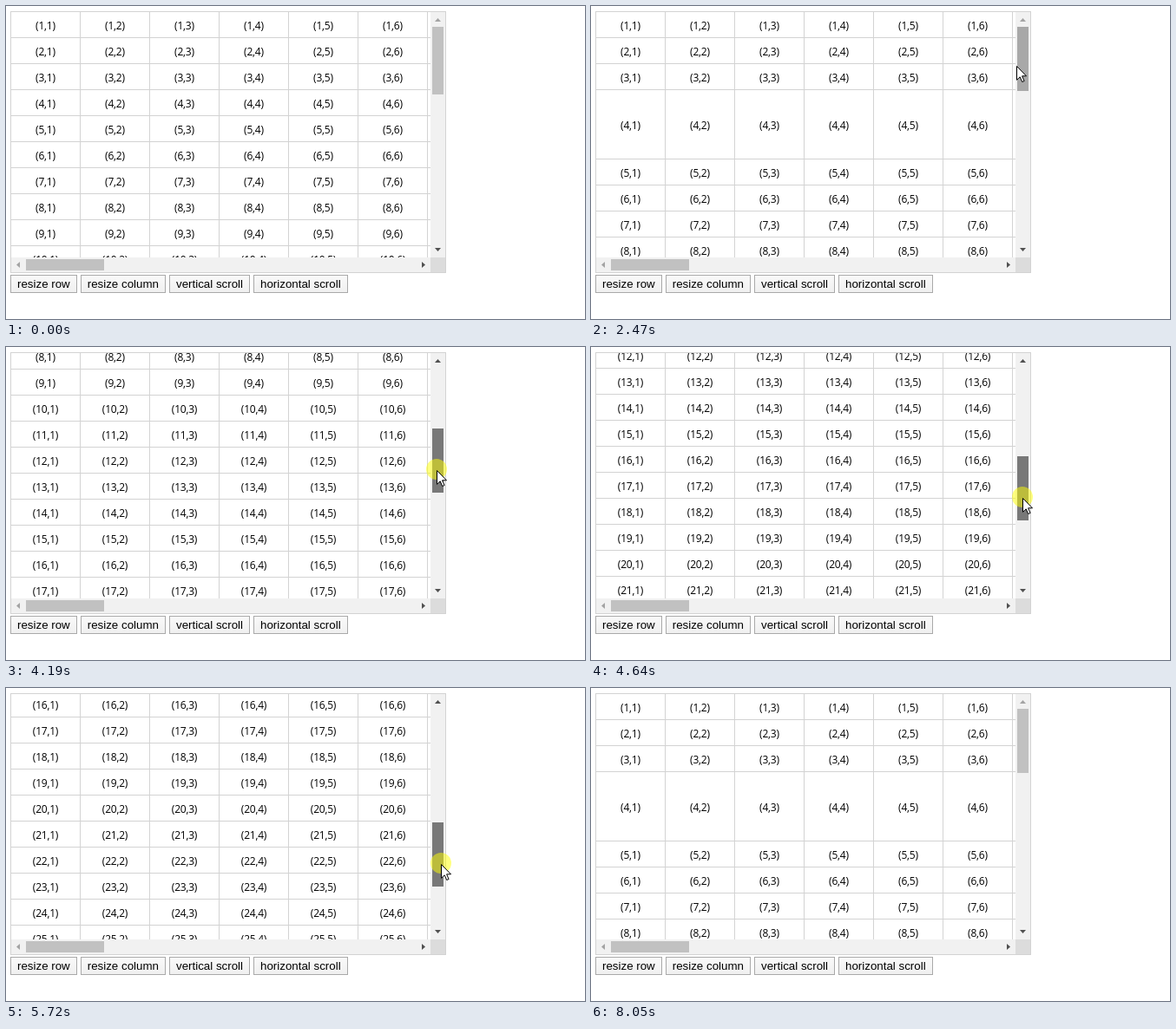
An HTML page for the animation above (8590 ms loop, 667 px wide and 361 px high).

```html
<!DOCTYPE html>
<html lang="en">
<head>
<meta charset="utf-8">
<title>Grid: resize and scroll</title>
<style>
  html, body { margin: 0; width: 100%; height: 100%; overflow: hidden; background: #fff; }
  body { position: relative; pointer-events: none; user-select: none; }
  body > * { position: absolute; box-sizing: border-box; }
  #frame { left: 5px; top: 6px; width: 502px; height: 302px; border: 1px solid #d3d3d3; }
  #view { left: 6px; top: 7px; width: 483px; height: 283px; overflow: hidden; }
  .row { display: flex; width: 560px; height: 30px; }
  .row span {
    box-sizing: border-box; width: 80px; padding-top: 2px;
    display: flex; align-items: center; justify-content: center;
    border: solid #d3d3d3; border-width: 0 1px 1px 0;
    font: 12px "Open Sans", "Noto Sans", sans-serif; letter-spacing: -.2px; color: #000;
  }
  .track { background: #f1f1f1; }
  .thumb { background: #c1c1c1; }
  #vtrack { left: 489px; top: 7px; width: 17px; height: 283px; }
  #htrack { left: 6px; top: 290px; width: 483px; height: 17px; }
  #corner { left: 489px; top: 290px; width: 17px; height: 17px; background: #dcdcdc; }
  #vthumb { left: 491px; width: 13px; }
  #hthumb { left: 23px; top: 292px; width: 90px; height: 13px; }
  #bar { left: 5px; top: 310px; display: flex; gap: 4px; }
  .btn {
    box-sizing: border-box; height: 21px; padding: 0 7px; white-space: nowrap;
    border: 1px solid #a9a9a9; background: linear-gradient(#f9f9f9, #f0f0f0);
    font: 13.333px/19px "Liberation Sans", Arial, sans-serif; color: #000;
  }
  .btn.hover { border-color: #7b7b7b; background: linear-gradient(#fcfcfc, #f4f4f4); }
  .btn.down { border-color: #707070; background: linear-gradient(#dedede, #e8e8e8); }
  svg { left: 0; top: 0; }
</style>
</head>
<body>
<div id="frame"></div>
<div id="view"><div id="rows"></div></div>
<div id="vtrack" class="track"></div>
<div id="htrack" class="track"></div>
<div id="corner"></div>
<div id="vthumb" class="thumb"></div>
<div id="hthumb" class="thumb"></div>
<div id="bar">
  <div class="btn">resize row</div>
  <div class="btn">resize column</div>
  <div class="btn">vertical scroll</div>
  <div class="btn">horizontal scroll</div>
</div>
<svg width="667" height="361">
  <path id="up" d="M494 18h7l-3.5 -4z"/>
  <path id="down" d="M494 279h7l-3.5 4z"/>
  <path fill="#a3a3a3" d="M16 295v7l-4 -3.5z"/>
  <path fill="#505050" d="M479 295v7l4 -3.5z"/>
  <g id="mouse">
    <circle id="halo" r="12" fill="#ff0" fill-opacity=".5"/>
    <path d="M.5 1.5V17.3L4.2 13.8 6.7 19.5 9.1 18.5 6.6 12.8H11.5Z" fill="#fff" stroke="#000"/>
  </g>
</svg>
<script>
const LOOP = 8590, DELAY = 230, STEP = 77.2;
const VIEW = 283, TRACK = 249, TRACK_TOP = 24, GRAB_Y = 71;

// moments, counted in steps
const CLICK = 14, RESIZE = 16, GRAB = 33, RELEASE = 87, LEAVE = 90, END = 101;

// where the pointer changes course: step, x, y
const path = [
  [0, 406, 278], [8, 130, 328], [11, 52, 316], [12, 51, 321], [17, 51, 321],
  [29, 490, 68], [32, 495, GRAB_Y], [34, 496, GRAB_Y],
  [44, 496, 104.63], [57, 497, 173.2], [67, 504, 227], [68, 504, 227],
  [71, 501, 202.14], [81, 499, 80.91], [85, 499, 62], [RELEASE, 499, 62],
  [88, 499, 64], [89, 499, 64], [END, 606, 370]
];

const $ = id => document.getElementById(id);
const within = (v, a, b) => v >= a && v < b;
const clamp = (v, a, b) => Math.min(b, Math.max(a, v));
const smooth = f => f * f * (3 - 2 * f);

for (let r = 1; r <= 30; r++) {
  const row = document.createElement("div");
  row.className = "row";
  for (let c = 1; c <= 7; c++) {
    const cell = document.createElement("span");
    cell.textContent = `(${r},${c})`;
    row.append(cell);
  }
  $("rows").append(row);
}
const tallRow = $("rows").children[3];
const buttons = document.querySelectorAll(".btn");

function pointerAt(step) {
  const s = clamp(step, 0, END - 1);
  const i = path.findIndex(k => k[0] > s);
  const [s0, x0, y0] = path[i - 1], [s1, x1, y1] = path[i];
  const part = (s - s0) / (s1 - s0);
  const f = within(s, GRAB, RELEASE) ? part : smooth(part);
  return [x0 + (x1 - x0) * f, y0 + (y1 - y0) * f];
}

function draw(step) {
  const [px, py] = pointerAt(step);
  const x = Math.floor(px), y = Math.floor(py);
  const visible = within(step, 0, END);
  const clicking = within(step, CLICK, RESIZE);
  const dragging = within(step, GRAB, LEAVE);

  const content = step < RESIZE ? 905 : 955;
  const limit = content - VIEW;
  const size = TRACK * VIEW / content;
  const rate = limit / (TRACK - size);
  const scroll = dragging ? Math.round(clamp((py - GRAB_Y) * rate, 0, limit)) : 0;

  tallRow.style.height = (step < RESIZE ? 30 : 80) + "px";
  $("rows").style.transform = `translateY(${-scroll}px)`;

  const top = TRACK_TOP + Math.floor(scroll / rate), height = Math.round(size);
  const over = visible && within(x, 490, 505) && within(y, top, top + height);
  Object.assign($("vthumb").style, {
    top: top + "px",
    height: height + "px",
    background: dragging ? "#787878" : over ? "#a8a8a8" : "#c1c1c1"
  });
  $("up").setAttribute("fill", scroll > 0 ? "#505050" : "#a3a3a3");
  $("down").setAttribute("fill", scroll < limit ? "#505050" : "#a3a3a3");

  for (const b of buttons) {
    const box = b.getBoundingClientRect();
    const hover = visible && within(x, box.left, box.right) && within(y + 1, box.top, box.bottom);
    b.classList.toggle("hover", hover);
    b.classList.toggle("down", hover && clicking);
  }

  $("mouse").style.display = visible ? "" : "none";
  $("mouse").setAttribute("transform", `translate(${x} ${y})`);
  $("halo").style.display = clicking || within(step, GRAB, RELEASE) ? "" : "none";
}

const start = performance.now();
let last;
function frame() {
  const t = Math.max(0, performance.now() - start) % LOOP;
  const step = Math.floor((t - DELAY) / STEP);
  if (step !== last) draw(last = step);
  requestAnimationFrame(frame);
}
frame();
</script>
</body>
</html>
```
